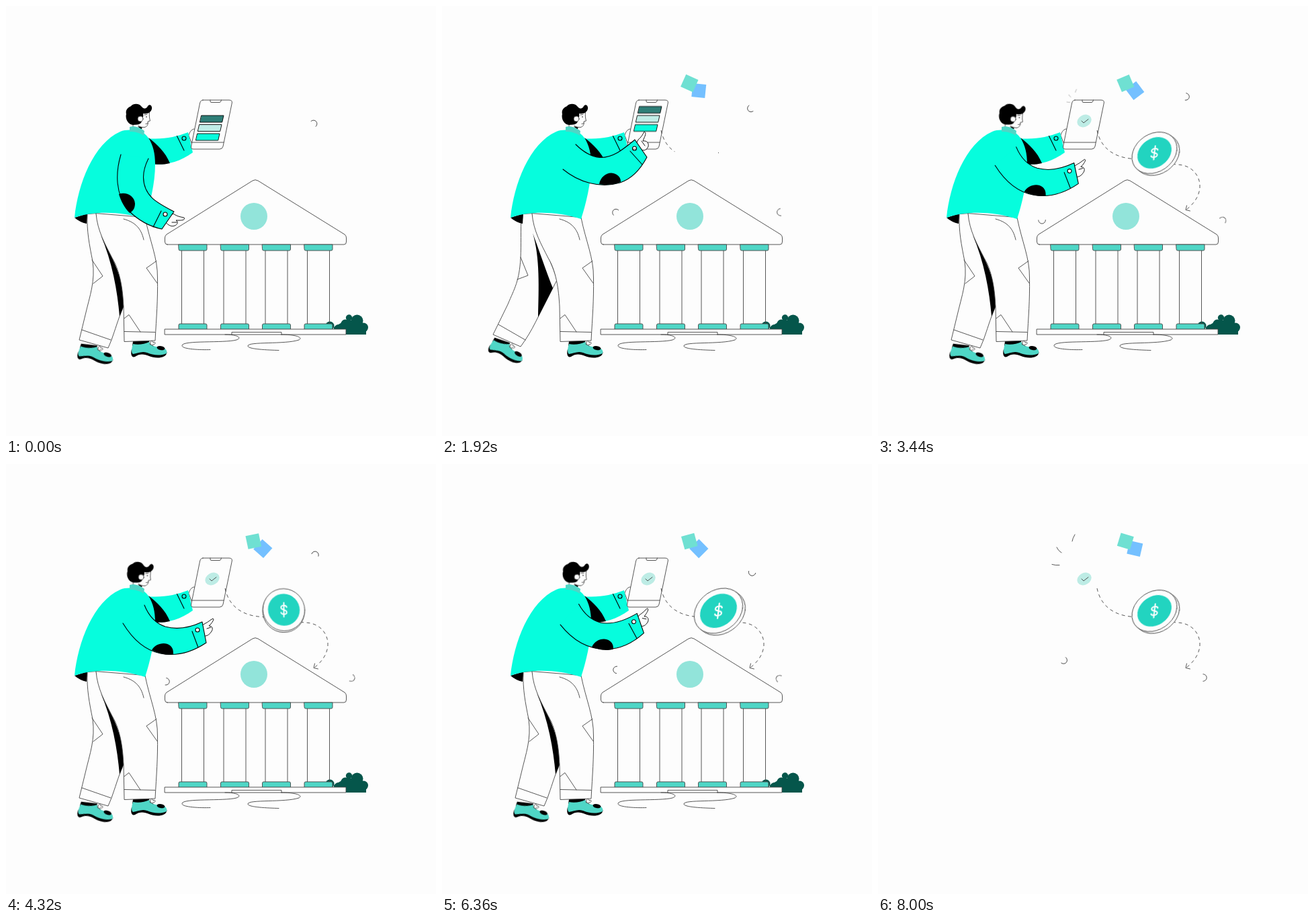
These frames come from a looping animation (640x640 px, 8.04 s). An HTML page:

```html
<!DOCTYPE html>
<html lang="en">
<head>
<meta charset="utf-8">
<title>Paying the bank by phone</title>
<style>
html, body { margin: 0; width: 100%; height: 100%; overflow: hidden; background: #fdfdfd; }
svg { display: block; width: 100vw; height: 100vh; fill: none; stroke: #444; stroke-width: .9; stroke-linejoin: round; stroke-linecap: round; }
.w { fill: #fdfdfd; }
.k { fill: #000; stroke: none; }
.jacket { fill: #06fddd; }
.teal { fill: #4fd6c6; }
.bare { stroke: none; }
.ink { stroke: #000; stroke-width: 1.1; }

/* one shared clock */
[class] { animation: 8.04s linear infinite; }

/* scene leaves for the last 40 ms, decorations miss the first 40 ms */
.scene { animation-name: scene; animation-timing-function: step-end; }
.deco { animation-name: deco; animation-timing-function: step-end; }
@keyframes scene { 0% { visibility: visible } 99.5%, 100% { visibility: hidden } }
@keyframes deco { 0% { visibility: hidden } .49%, 100% { visibility: visible } }

/* spinning pieces: a quarter turn per second */
.spin { animation-name: spin; rotate: var(--a); }
.back { animation-name: unspin; }
@keyframes spin { from { rotate: var(--a) } to { rotate: calc(var(--a) + 723.6deg) } }
@keyframes unspin { from { rotate: var(--a) } to { rotate: calc(var(--a) - 723.6deg) } }
.arc1 { --a: 318deg; animation-name: unspin, drift1; }
.arc2 { --a: 38deg; animation-name: unspin, drift2; }
.arc3 { --a: 0deg; animation-name: spin, drift3; }
@keyframes drift1 {
  0% { translate: 458px 175px } 10% { translate: 458px 166px } 24% { translate: 459.5px 152.5px }
  42.8% { translate: 458.5px 135px } 52% { translate: 460px 133px } 64.2% { translate: 461px 146.5px }
  79.1% { translate: 461.5px 161.5px } 100% { translate: 460px 183px }
}
@keyframes drift2 {
  0%, 100% { translate: 277px 292px } 52% { translate: 237px 325px }
}
@keyframes drift3 {
  0% { translate: 484px 293px } 24% { translate: 503.5px 307px } 42.8% { translate: 513px 319px }
  52% { translate: 515px 318.5px } 64.2% { translate: 510px 318.5px } 79.1% { translate: 502px 319.5px }
  100% { translate: 484px 318px }
}

/* pointing arm */
.arm, .elbow, .hand { animation-name: arm; animation-timing-function: ease-in-out; d: var(--rest); }
@keyframes arm {
  0%, 11%, 98%, 100% { d: var(--rest) }
  20%, 29.5%, 85%, 87.5% { d: var(--tap) }
  45%, 75% { d: var(--mid) }
}
.arm {
  --rest: path("M171,221 C163,248 162,280 183,305 C196,318 213,328 232,332 L250,306 C225,293 205,283 204.5,255 C204.5,243 208,235 212,227 M219,329 L231,305 M240,310 A3,3 0 1 1 234,310 A3,3 0 1 1 240,310");
  --mid: path("M174,237 C188,260 205,277 230,282 C255,287 277,280 298,266 L292,235 C275,243 255,247 237,242 C222,237 212,225 206,210 M277,249 L286,273 M288,247 A3,3 0 1 1 282,247 A3,3 0 1 1 288,247");
  --tap: path("M180,243 C203,262 235,272 265,263 C283,257 296,242 305,225 L287,199 C270,213 255,226 235,225.5 C220,224 208,215 199,206 M280,216 L298,236 M289.5,212 A3,3 0 1 1 283.5,212 A3,3 0 1 1 289.5,212");
}
.elbow {
  --rest: path("M168,280 C178,276 191,282 192,294 C192,302 188,306 184,308 C176,300 171,290 168,280Z");
  --mid: path("M217,277 C222,267 237,264 244,270 C249,274 249,279 249,283 C239,285 228,282 217,277Z");
  --tap: path("M234,265 C236,252 250,244 260,251 C266,255 266,259 266,262 C256,266 244,267 234,265Z");
}
.hand {
  --rest: path("M246,311 L249,309 C254,313 260,314 265,315 C267,318 263,319 259,319 L253,319 C257,321 255,326 251,327 C246,329 241,326 238,322 M247,322 L254,322");
  --mid: path("M292,240 L297,237 C300,236 304,232 308,230 C310,231 308,234 305,238 L302,241 C308,241 308,246 306,249 C302,255 299,256 295,256 M299,245 L305,243");
  --tap: path("M289,205 L292,199 C296,196 299,191 301,187 C304,188 303,192 301,196 L299,201 C305,200 308,204 307,209 C305,214 301,216 297,214 M297,201 L302,208");
}
.head { animation-name: head; animation-timing-function: ease-in-out; transform-origin: 196px 182px; }
@keyframes head {
  0%, 29.5%, 85%, 100% { transform: none }
  45%, 75% { transform: rotate(5deg) }
}

/* backward step */
.leg, .gap { animation-name: step; animation-timing-function: ease-in-out; d: var(--rest); }
@keyframes step {
  0%, 10.9%, 41.5%, 100% { d: var(--rest) }
  20%, 28.5% { d: var(--out) }
}
.leg {
  --rest: path("M121,310 C120,335 124,355 129,380 C133,410 125,430 118,460 L109,497 L152,509 L157,497 C163,480 166,470 169,462 L175,447 C172,400 150,365 134,309Z M113,482 L156,497 M128,378 L144,402 L130,413");
  --out: path("M118,310 C117,335 118,355 117,375 C115,410 108,420 98,444 L76,489 L117,507 L124,497 C132,485 138,473 143,463 L171,408 C165,385 150,360 134,309Z M84,474 L124,497 M117,374 L128,401 L112,407");
}
.gap {
  --rest: path("M141,341 C158,380 166,425 169,462 L175,447 C175,415 172,400 141,341Z");
  --out: path("M135,338 C146,375 144,420 143,463 L165,420 C155,395 145,365 135,338Z");
}
.foot { animation-name: foot; animation-timing-function: ease-in-out; transform-origin: 131px 503px; }
@keyframes foot {
  0%, 10.9%, 41.5%, 100% { transform: none }
  20%, 28.5% { transform: translate(-34px, -5px) rotate(12deg) }
}

/* phone screen */
.bars { animation-name: bars; animation-timing-function: ease-in-out; }
@keyframes bars {
  0%, 20% { transform: none; opacity: 1 }
  23.5%, 27% { transform: translate(3px, -13.5px); opacity: 1 }
  30%, 100% { transform: translate(3px, -13.5px); opacity: 0 }
}
.check { animation-name: check; animation-timing-function: ease-out; transform-origin: 307px 171px; }
@keyframes check { 0%, 29% { transform: scale(0) } 34%, 100% { transform: none } }
.ticks { animation-name: ticks; transform-origin: 297px 138px; }
@keyframes ticks {
  0%, 41.2% { transform: scale(0); opacity: 1 }
  45% { transform: none; opacity: 1 }
  46.5% { transform: none; opacity: 0 }
  46.6%, 96% { transform: scale(0); opacity: 1 }
  99.5%, 100% { transform: none; opacity: 1 }
}

/* payment trail and coin */
.trail { animation-name: trail; stroke-dasharray: 1 2; }
@keyframes trail { 0%, 21.4% { stroke-dashoffset: 1.02 } 35%, 100% { stroke-dashoffset: 0 } }
.tip { animation-name: tip; animation-timing-function: step-end; }
@keyframes tip { 0% { opacity: 0 } 35%, 100% { opacity: 1 } }
.coin, .rim { animation-name: coin; animation-timing-function: ease-in-out; }
@keyframes coin {
  0%, 25.8% { transform: matrix(.001, 0, 0, .001, 411.5, 218.5) }
  31.5%, 42.8%, 99.5%, 100% { transform: matrix(1.01, -.11, -.11, .93, 411.5, 218.5) }
  64.2% { transform: matrix(.87, .12, .12, 1.01, 415.5, 215.5) }
  79.1% { transform: matrix(1.09, -.12, -.12, 1.01, 411.5, 218.5) }
}
.edge { animation-name: edge; animation-timing-function: ease-in-out; }
@keyframes edge {
  0%, 25.8% { translate: 0 0 }
  31.5%, 42.8%, 79.1%, 99.5%, 100% { translate: 3.8px 2.8px }
  64.2% { translate: -4.5px 2px }
}
circle { vector-effect: non-scaling-stroke; }
</style>
</head>
<body>
<svg viewBox="0 0 640 640">
  <defs>
    <g id="column">
      <path class="w" d="M4.5,364 V473 M37.5,364 V473"/>
      <path class="teal" d="M0,355 H42 V362 Q42,364 40,364 H2 Q0,364 0,362Z M0,481 V475 Q0,473 2,473 H40 Q42,473 42,475 V481Z"/>
    </g>
    <g id="shoe">
      <path class="k" d="M189,499 L213,498 L214,505 L188,506Z M187,511 C185,518 187,524 192,522 C199,517 206,518 213,521 C222,525 239,525 239.500,515Z"/>
      <path class="teal bare" d="M189,503 C197,505 207,503 213,500 C217,508 226,507 233,508 C239,510 240,514 239,517 C230,521 219,520 210,516 C202,513 196,517 189,518 C186,516 187,509 189,503Z"/>
      <ellipse class="k" cx="230.500" cy="509" rx="6" ry="3" transform="rotate(10 230 509)"/>
      <path class="w" d="M215,504 C214,499 218,496 219,501 C223,499 224,504 218,504 M214,503 L219,506"/>
    </g>
    <path id="bar" d="M291,163 H324 L321.700,173 H288.700Z"/>
    <path id="arc" d="M-.5,-5.300 A5.300,5.300 0 0 1 -.5,5.300"/>
    <path id="route" d="M326,185 C331,210 350,226 381,227.500 L444,236 C470,236 480,256 479,270 C478,285 468,296 459,303"/>
    <mask id="reveal" maskUnits="userSpaceOnUse" x="300" y="160" width="220" height="170">
      <path class="trail" pathLength="1" stroke="#fff" stroke-width="8" stroke-linecap="butt" d="M326,185 C331,210 350,226 381,227.500 L444,236 C470,236 480,256 479,270 C478,285 468,296 459,303"/>
    </mask>
  </defs>

  <g class="scene">
    <!-- bush and bank -->
    <g fill="#05564b" stroke="none">
      <circle cx="482" cy="476" r="6.500"/><circle cx="495" cy="481" r="7"/><circle cx="505" cy="473" r="6.500"/>
      <circle cx="510.500" cy="464" r="4.700"/><circle cx="522.500" cy="468.500" r="9"/><circle cx="532" cy="478.500" r="7"/>
      <path d="M488,489 V478 L505,468 H525 L536,480 V489Z"/>
    </g>
    <path class="w" d="M240,355 H503 Q506.500,355 506.500,351 V345 Q506.500,342 504,340 L375,260 Q371,257.500 367,260 L239,340 Q236.500,342 236.500,345 V351 Q236.500,355 240,355Z"/>
    <circle cx="369" cy="313" r="20" fill="#92e4da" stroke="none"/>
    <use href="#column" x="257"/><use href="#column" x="319.500"/><use href="#column" x="381.500"/><use href="#column" x="444"/>
    <path class="w" d="M236.500,481 H506 V489 H236.500Z M336,489 V485.500 H410 V489"/>
    <path d="M326,489 C345,489 352,494 343,497 C325,502 262,497 262,505.500 C262,511 290,512 304,511.500 M410,489 C430,489 443,493 436,497 C415,504 360,499 360,506 C360,511 390,512 406,512.500"/>

    <!-- legs -->
    <g class="foot"><use href="#shoe" transform="translate(107 517) rotate(9) translate(-186.500 -514)"/></g>
    <path class="leg w"/>
    <path class="gap k"/>
    <use href="#shoe"/>
    <path class="w" d="M134,309 C136,335 148,355 158,375 C172,398 174,430 175,447 L176,499.500 L222,498 C224,460 226,440 225.500,405 C226,375 214,350 207,315Z"/>
    <path d="M176,484.500 L222,485.500 M176,465 L183,459.500 L200,485 M224,379.500 L209,390 L225,412.500 M175,317 C190,321 201,329 205,348"/>

    <!-- jacket, far arm and phone -->
    <path class="k" d="M102,315 Q110,322 120,324 L121,309Z"/>
    <path class="w" d="M272,192 C274,186 277,183 281,183 L283,205 H277Z"/>
    <path class="jacket bare" d="M210,197 C235,199 252,195 271,188 L278,218 C260,231 243,236 220,236Z"/>
    <path class="jacket bare" d="M102,315 C107,265 130,205 170,187 C180,183 195,184 206,190 C215,197 222,212 222,235 C222,265 214,295 207,317 C170,305 130,305 102,315Z"/>
    <path class="k" d="M212,196 C225,206 237,217 244,234 C236,236 229,236 222,235.500 C222,220 219,207 212,196Z"/>
    <path class="ink" d="M254.500,193.500 L265,215"/>
    <circle class="ink" cx="265" cy="197" r="3"/>
    <path class="w" d="M293,140 H332 Q337.500,140 336.200,145 L323,209 Q322,213 318,213 H279 Q274.500,213 275.800,208 L288.500,145 Q289.500,140 293,140Z M304,140 V142 Q304,143.500 306,143.500 H318 Q320,143.500 320.500,140 M276.500,203 H324"/>
    <g class="bars" stroke="#000">
      <use href="#bar" fill="#2f7f78"/>
      <use href="#bar" fill="#c0ede7" x="-3" y="13.500"/>
      <use href="#bar" fill="#06fddd" x="-6" y="27"/>
    </g>

    <!-- head -->
    <g class="head">
      <path class="w bare" d="M189,172 H203 V186 H189Z"/>
      <path d="M189,175 V182"/>
      <path class="w" d="M195,174 L203,158 C207,160 211,160 213.500,158 C213,163 213.500,167 214.500,171 L211,172 C212,176 210,180 206,180.500 C202,180.500 199,180 197,178"/>
      <path class="k" d="M190,177 C182,177 177,168 179,161 C177,153 184,150 186,149 C190,144 199,145 202,150 C206,154 209,153 211,149 C214,145 218,149 217,153 C216,159 209,161 204,160 C205,165 203,170 201,174 C197,178 193,176 190,177Z M196,179 L203,181 L201,184Z"/>
      <circle class="w" cx="200" cy="168" r="4"/>
      <circle class="k" cx="209" cy="165" r=".8"/>
      <path d="M206,162 L210,161.500 M208,175.500 Q210,176 211.500,174"/>
    </g>
    <path class="teal bare" d="M184,180 C191,178 200,181 206,186 L205,193 C198,188 191,187 184,187Z"/>

    <!-- near arm -->
    <path class="hand w" stroke="#000"/>
    <path class="arm jacket ink"/>
    <path class="elbow k"/>
  </g>

  <g class="deco">
    <g transform="translate(382.300 126)"><rect class="spin bare" style="--a:13deg" x="-10" y="-10" width="20" height="20" fill="#74c0ff"/></g>
    <g transform="translate(368.300 115)"><rect class="spin back bare" style="--a:17deg" x="-10" y="-10" width="20" height="20" fill="#6fe0d2"/></g>
    <g class="scene"><use href="#arc" class="arc1"/></g>
    <use href="#arc" class="arc2"/>
    <use href="#arc" class="arc3"/>

    <path class="ticks" d="M289,115 Q289.500,111 293,105 M266,124 Q268,129 273,132 M259,149.500 Q264,151 270,150.500"/>
    <g class="check">
      <ellipse cx="307" cy="171" rx="11.200" ry="8.800" transform="rotate(-30 307 171)" fill="#bdece5" stroke="none"/>
      <path d="M303,171 L306,174 L313,168.500"/>
    </g>

    <g mask="url(#reveal)"><use href="#route" stroke-dasharray="5 4.500" stroke-linecap="butt"/></g>
    <path class="tip" d="M459.500,297 L458,303.500 L464.500,305"/>
    <g class="edge"><circle class="rim w" r="33"/></g>
    <g class="coin">
      <circle class="w" r="33"/>
      <circle r="25" fill="#22d4c0" stroke="none"/>
      <path stroke="#fff" stroke-width="2" d="M4.500,-4 C3,-8 -4.500,-7.500 -4.500,-3.500 C-4.500,1 4.500,-1 4.500,4 C4.500,8 -3.500,8 -4.500,4.500 M0,-11 V11"/>
    </g>
  </g>
</svg>
</body>
</html>
```
